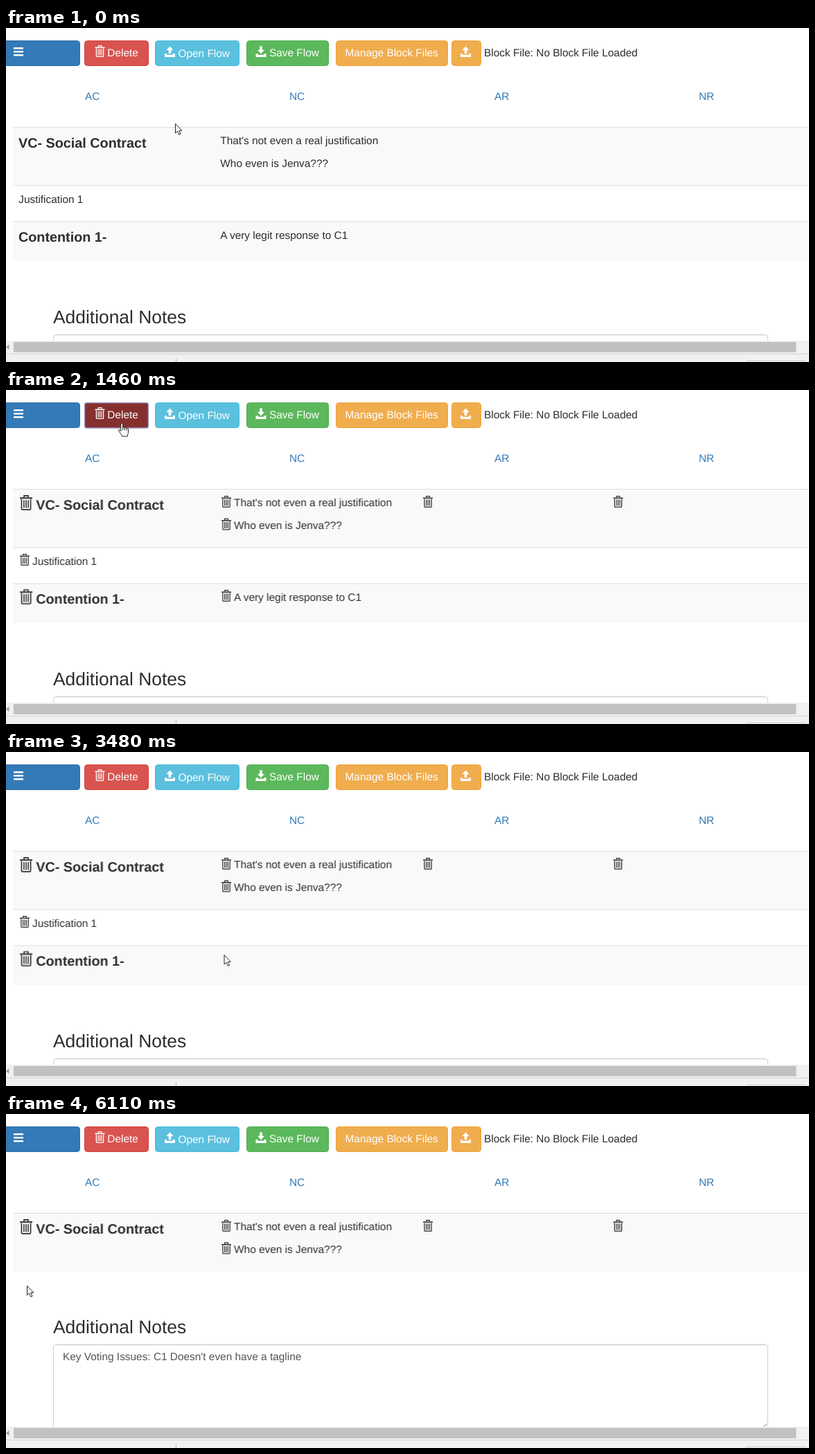
An HTML page that plays this animation: 1159 by 483 pixels, repeating every 7.27 s.

```html
<!DOCTYPE html>
<html lang="en">
<head>
<meta charset="utf-8">
<title>Flow table</title>
<style>
html, body { margin: 0; width: 100%; height: 100%; overflow: hidden; background: #fff; }
svg { display: block; width: 1159px; height: 483px; }
text { font: 15.4px "Liberation Sans", Arial, sans-serif; fill: #2d2d2d; text-rendering: geometricPrecision; }
.head { font-size: 19.8px; font-weight: bold; }
.title { font-size: 26.4px; }
.tabs text { fill: #337ab7; }
.label text { fill: #fff; }
.label { color: #fff; }
.field { fill: #555; }
.bins { color: #333; }
.line { fill: #ddd; }
.stripe { fill: #f9f9f9; }

/* every part shares one 7270 ms clock */
.anim { animation: 7270ms step-end infinite; }
.bins { animation-name: appear; }
.indent { animation-name: indent; }
.head.indent { animation-name: indent-head; }
#tab-hover { animation-name: tab-hover; }
#open-hover { animation-name: open-hover; }
#delete-hover { animation-name: delete-hover; }
#delete-active { animation-name: delete-active; }
#mark { animation-name: mark; }
#response { animation-name: response; }
#justification { animation-name: justification; }
#contention { animation-name: contention; }
#contention-fill { animation-name: justification; }
#notes { animation-name: notes; }
#cursor { animation-name: move; }
#hand { animation-name: hand; }
#arrow { animation-name: arrow; }

@keyframes appear { 0% { opacity: 0 } 20.08%, 100% { opacity: 1 } }
@keyframes indent { 0% { transform: none } 20.08%, 100% { transform: translateX(19.7px) } }
@keyframes indent-head { 0% { transform: none } 20.08%, 100% { transform: translateX(25.3px) } }
@keyframes tab-hover { 0%, 10.45%, 23.41%, 100% { opacity: 0 } 8.39%, 22.42% { opacity: 1 } }
@keyframes open-hover { 0%, 11.55%, 100% { opacity: 0 } 10.45% { opacity: 1 } }
@keyframes delete-hover { 0%, 18.98%, 100% { opacity: 0 } 14.75% { opacity: 1 } }
@keyframes delete-active { 0%, 37.13%, 100% { opacity: 0 } 18.98% { opacity: 1 } }
@keyframes mark { 0%, 37.13%, 100% { opacity: 0 } 22.42% { opacity: 1 } }
@keyframes response { 0% { opacity: 1 } 39.47%, 100% { opacity: 0 } }
@keyframes justification { 0% { opacity: 1 } 72.35%, 100% { opacity: 0 } }
@keyframes contention {
  0% { transform: none; opacity: 1 }
  72.35% { transform: translateY(-52px); opacity: 1 }
  84.04%, 100% { transform: translateY(-52px); opacity: 0 }
}
@keyframes notes {
  0% { transform: none }
  72.35% { transform: translateY(-52px) }
  84.04%, 100% { transform: translateY(-110px) }
}
@keyframes hand {
  0%, 23.41%, 39.47%, 84.04%, 100% { opacity: 0 }
  8.39%, 35.07%, 65.74% { opacity: 1 }
}
@keyframes arrow {
  0%, 23.41%, 39.47%, 84.04%, 100% { opacity: 1 }
  8.39%, 35.07%, 65.74% { opacity: 0 }
}
@keyframes move {
  0% { transform: translate(244px, 138px) }
  8.39% { transform: translate(243px, 112px) }
  9.49% { transform: translate(237px, 82px) }
  10.45% { transform: translate(222px, 50px) }
  11.55% { transform: translate(190px, 66px) }
  12.65% { transform: translate(190px, 66px); animation-timing-function: steps(4, start) }
  16.87% { transform: translate(167px, 48px) }
  22.42% { transform: translate(167px, 48px); animation-timing-function: steps(5, start) }
  27.41% { transform: translate(311px, 241px) }
  29.84% { transform: translate(311px, 241px); animation-timing-function: steps(6, start) }
  36.11% { transform: translate(318px, 293px) }
  47.86% { transform: translate(318px, 293px); animation-timing-function: steps(2, start) }
  50.06% { transform: translate(311px, 293px) }
  51.03% { transform: translate(311px, 293px); animation-timing-function: steps(2, start) }
  53.16% { transform: translate(257px, 275px); animation-timing-function: steps(3, start) }
  56.35% { transform: translate(175px, 283px) }
  59.42% { transform: translate(128px, 276px) }
  60.47% { transform: translate(128px, 276px); animation-timing-function: steps(6, start) }
  66.8%, 100% { transform: translate(30px, 248px) }
}
</style>
</head>
<body>
<svg viewBox="0 0 1159 483" xmlns="http://www.w3.org/2000/svg">
  <defs>
    <g id="bin" fill="none" stroke="currentColor" stroke-width="1.3">
      <path d="M4.7 2.6V.7H9.3V2.6M1.9 4.4V15.4Q1.9 16.4 2.9 16.4H11.1Q12.1 16.4 12.1 15.4V4.4"/>
      <path d="M0 3.3H14" stroke-width="1.6"/>
      <path d="M4.6 5.6V14.4M7 5.6V14.4M9.4 5.6V14.4" stroke-width="1.2"/>
    </g>
    <path id="tray" d="M0 10.5H3V12.3H12V10.5H15V15.5H0Z" fill="currentColor"/>
    <g id="upload">
      <use href="#tray"/>
      <path d="M7.5 0L12.6 5.6H9.4V10.5H5.6V5.6H2.4Z" fill="currentColor"/>
    </g>
    <g id="download">
      <use href="#tray"/>
      <path d="M7.5 10.8L12.6 5.2H9.4V0H5.6V5.2H2.4Z" fill="currentColor"/>
    </g>
    <clipPath id="view"><rect width="1159" height="452"/></clipPath>
  </defs>

  <rect width="1159" height="483" fill="#fff"/>

  <!-- toolbar -->
  <rect x="-9.5" y="18.5" width="116" height="36" rx="4" fill="#337ab7" stroke="#2e6da4"/>
  <rect x="113.5" y="18.5" width="92" height="36" rx="4" fill="#d9534f" stroke="#d43f3a"/>
  <rect id="delete-hover" class="anim" x="113.5" y="18.5" width="92" height="36" rx="4" fill="#c9302c" stroke="#ac2925"/>
  <g id="delete-active" class="anim">
    <rect x="113.5" y="18.5" width="92" height="36.5" rx="3" fill="#85302f" stroke="#9a9bcb" stroke-width="1.4"/>
  </g>
  <path id="mark" class="anim" d="M166 51H171V48H174V51H178V54H166Z" fill="#d8302c"/>
  <rect x="215.5" y="18.5" width="121" height="36" rx="4" fill="#5bc0de" stroke="#46b8da"/>
  <rect id="open-hover" class="anim" x="215.5" y="18.5" width="121" height="36" rx="4" fill="#31b0d5" stroke="#269abc"/>
  <rect x="347.5" y="18.5" width="118" height="36" rx="4" fill="#5cb85c" stroke="#4cae4c"/>
  <rect x="476.5" y="18.5" width="161" height="36" rx="4" fill="#f0ad4e" stroke="#eea236"/>
  <rect x="643.5" y="18.5" width="42" height="36" rx="4" fill="#f0ad4e" stroke="#eea236"/>
  <g class="label">
    <path d="M11 29.2H25M11 34.2H25M11 39.2H25" stroke="#fff" stroke-width="2.5"/>
    <use href="#bin" x="128.5" y="25"/>
    <use href="#upload" x="229" y="26.5"/>
    <use href="#download" x="360.5" y="26.5"/>
    <use href="#upload" x="656" y="26.5"/>
    <text x="146.3" y="41">Delete</text>
    <text x="248.5" y="42">Open Flow</text>
    <text x="380" y="41">Save Flow</text>
    <text x="489.5" y="41">Manage Block Files</text>
  </g>
  <text x="690" y="41">Block File: No Block File Loaded</text>

  <!-- tabs -->
  <rect id="tab-hover" class="anim" x="-23" y="77" width="295" height="44" rx="4" fill="#eee"/>
  <g class="tabs">
    <text x="114" y="104">AC</text>
    <text x="409" y="104">NC</text>
    <text x="705" y="104">AR</text>
    <text x="1000" y="104">NR</text>
  </g>

  <!-- table -->
  <rect class="stripe" x="10" y="143" width="1148" height="85"/>
  <rect class="line" x="10" y="143" width="1148" height="1"/>
  <text class="head indent anim" x="18" y="173">VC- Social Contract</text>
  <text class="indent anim" x="309.3" y="168">That's not even a real justification</text>
  <text class="indent anim" x="309.3" y="201">Who even is Jenva???</text>
  <g class="bins anim">
    <use href="#bin" transform="translate(20 152) scale(1.286)"/>
    <use href="#bin" x="311" y="153"/>
    <use href="#bin" x="311" y="185.5"/>
    <use href="#bin" x="602" y="153"/>
    <use href="#bin" x="876.5" y="153"/>
  </g>

  <g id="justification" class="anim">
    <rect class="line" x="10" y="227.5" width="1148" height="1"/>
    <text class="indent anim" x="18.2" y="253">Justification 1</text>
    <g class="bins anim"><use href="#bin" x="20" y="237"/></g>
  </g>

  <g id="contention" class="anim">
    <rect id="contention-fill" class="stripe anim" x="10" y="280" width="1148" height="57"/>
    <rect class="line" x="10" y="279.5" width="1148" height="1"/>
    <text class="head indent anim" x="18" y="309">Contention 1-</text>
    <g class="bins anim"><use href="#bin" transform="translate(20 288) scale(1.286)"/></g>
    <g id="response" class="anim">
      <text class="indent anim" x="309.3" y="305">A very legit response to C1</text>
      <g class="bins anim"><use href="#bin" x="311" y="289"/></g>
    </g>
  </g>

  <!-- notes -->
  <g clip-path="url(#view)">
    <g id="notes" class="anim">
      <text class="title" x="68" y="427">Additional Notes</text>
      <rect x="68.5" y="443.5" width="1031" height="122" rx="4" fill="#fff" stroke="#ccc"/>
      <path d="M71 444.7H1097" stroke="#eee"/>
      <text class="field" x="82" y="466">Key Voting Issues: C1 Doesn't even have a tagline</text>
      <path d="M1092 564L1098 558M1096 564L1098 562" stroke="#777" stroke-width="1"/>
    </g>
  </g>

  <!-- scrollbar and window edge -->
  <rect y="452" width="1159" height="31" fill="#f1f1f1"/>
  <rect x="11" y="454" width="1129.5" height="15" fill="#c1c1c1"/>
  <path d="M0 461.5L4.5 457.5V465.5Z" fill="#a3a3a3"/>
  <rect y="471" width="1159" height="1" fill="#d2d2d2"/>
  <rect x="245" y="478" width="1" height="5" fill="#b5b5b5"/>
  <rect x="1068.5" y="481.5" width="86" height="8" rx="2" fill="#fff" stroke="#c4c4c4"/>

  <g id="cursor" class="anim" fill="#fff" stroke="#222" stroke-linejoin="round">
    <path id="arrow" class="anim" d="M.5 .5V14L3.5 11.2L5.8 16.4L8 15.4L5.8 10.4H9.8Z"/>
    <g id="hand" class="anim">
      <path d="M-1.2 11.5V1.8C-1.2 .1 1.6 .1 1.6 1.8V6.5C2 5.6 4.3 5.7 4.4 7C5 6.2 7 6.4 7.1 7.7C7.7 7 9.5 7.4 9.5 9V13.2C9.5 15.5 8.4 16 8.2 19H.6C.4 17-2.6 14-4.4 11C-5.2 9.6-3.4 8.6-2.4 9.8Z"/>
      <path d="M1.6 6.5V10M4.4 7V10.3M7.1 7.7V10.6" fill="none"/>
    </g>
  </g>
</svg>
</body>
</html>
```
